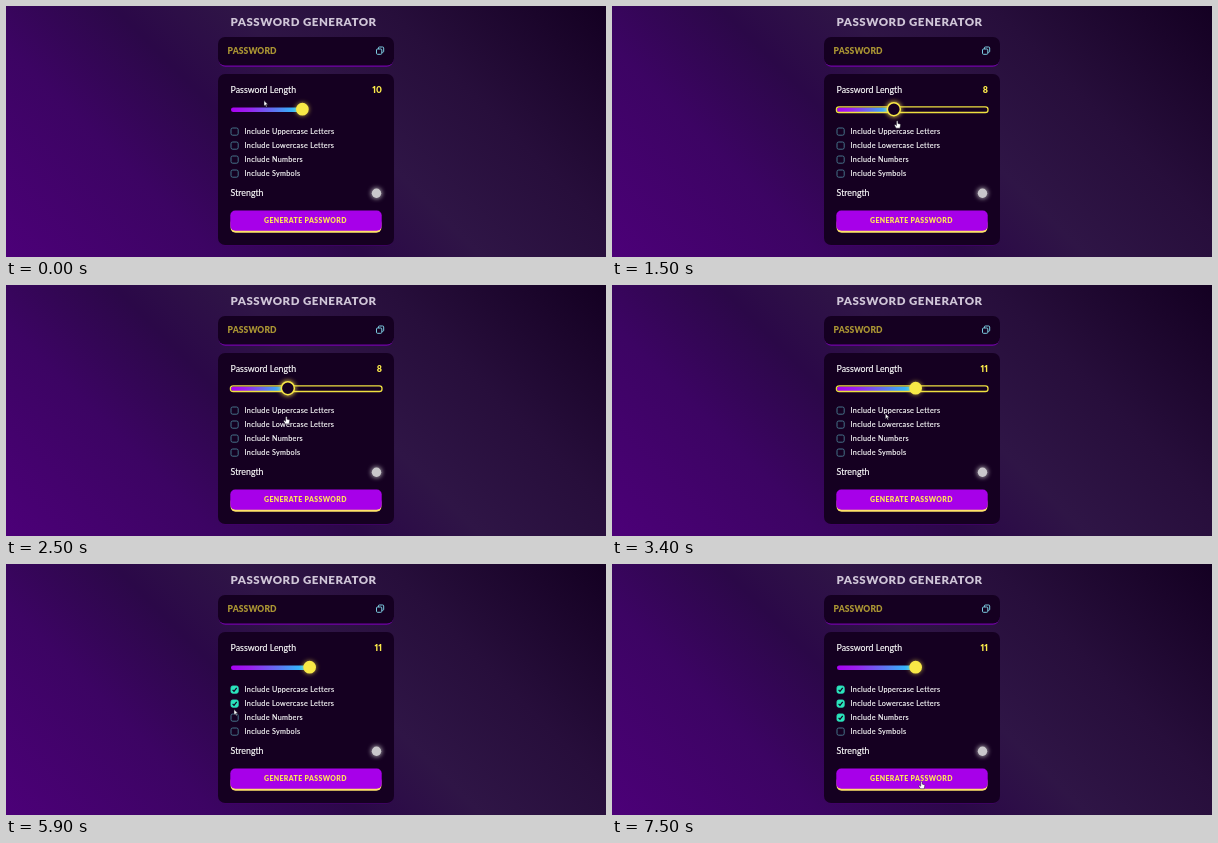
An HTML page for the animation above (8000 ms loop, 600 by 251 pixels).

```html
<!DOCTYPE html>
<html lang="en">
<head>
<meta charset="utf-8">
<title>Password generator</title>
<style>
  html, body { margin: 0; width: 100%; height: 100%; overflow: hidden; }
  body { background: linear-gradient(45deg, #4c0078, #3c0463 25%, #2b0848 42%, #2f1546 56%, #270e3b 74%, #140022); }
  svg { display: block; width: 100vw; height: 100vh; }
  text { font-family: Lato, "Open Sans", sans-serif; fill: #fff; }
  .bold { font-weight: 900; }
  .title { font-size: 11.5px; letter-spacing: .5px; fill: #d0c6d8; }
  .field { font-size: 8.5px; letter-spacing: .1px; fill: #aa9433; }
  .head, .label { stroke: #fff; stroke-width: .15px; }
  .head { font-size: 8.8px; }
  .label { font-size: 7.2px; letter-spacing: .32px; }
  .button { font-size: 6.9px; letter-spacing: .4px; fill: #ffe35a; }
  .value { font-size: 8.8px; fill: #fbe94a; font-variant-numeric: proportional-nums; }
</style>
</head>
<body>
<svg viewBox="0 0 600 251">
  <defs>
    <linearGradient id="fill">
      <stop offset="0" stop-color="#aa00f2"/>
      <stop offset=".25" stop-color="#9a22f0"/>
      <stop offset=".62" stop-color="#5c78f2"/>
      <stop offset="1" stop-color="#1fd4ff"/>
    </linearGradient>
    <filter id="blur" x="-100%" y="-100%" width="300%" height="300%">
      <feGaussianBlur stdDeviation="2.2"/>
    </filter>
  </defs>

  <text class="title bold" x="224.6" y="20.3">PASSWORD GENERATOR</text>

  <rect x="212.5" y="40" width="175" height="20.7" rx="7" fill="#7200a8"/>
  <rect x="212" y="31" width="176" height="28.6" rx="7" fill="#150021"/>
  <text class="field bold" x="221.6" y="48.2">PASSWORD</text>
  <g fill="#150021" stroke="#7ccbe0">
    <rect x="372.4" y="41" width="5.3" height="5.3" rx="1"/>
    <rect x="370.5" y="43" width="5.3" height="5.3" rx="1"/>
  </g>

  <rect x="212.5" y="80" width="175" height="159.7" rx="7" fill="#430069"/>
  <rect x="212" y="68" width="176" height="171" rx="7" fill="#150021"/>
  <text class="head" x="224.6" y="87.2">Password Length</text>
  <text class="value bold" id="value" x="376" y="87.2" text-anchor="end"></text>

  <rect id="bar" x="225" y="101.4" height="4.5" rx="2.2" fill="url(#fill)"/>
  <rect id="ring" x="224.4" y="100.9" width="151.6" height="5.6" rx="2.6" fill="none" stroke="#eee040" stroke-width="1.3"/>
  <g id="thumb">
    <circle id="glow" fill="#ffe84a" filter="url(#blur)"/>
    <circle id="knob" stroke="#f8e947" stroke-width="1.5"/>
  </g>

  <g id="options"></g>

  <text class="head" x="224.6" y="189.8">Strength</text>
  <circle cx="370.5" cy="187.2" r="5.8" fill="#ccc" opacity=".7" filter="url(#blur)"/>
  <circle cx="370.5" cy="187.2" r="4.7" fill="#c9c7cb"/>

  <rect x="224.6" y="212" width="150.8" height="14.8" rx="5" fill="#ffe36a"/>
  <rect x="224.3" y="204.5" width="151.4" height="20.2" rx="5" fill="#a700e9"/>
  <text class="button bold" x="258" y="216.9">GENERATE PASSWORD</text>

  <g id="cursor" fill="#fff" stroke="#171020" stroke-width=".5" stroke-linejoin="round">
    <path id="arrow" d="M0 0V5.4L1.3 4.3L2.2 6.3L3.1 5.9L2.2 3.9H3.9Z"/>
    <path id="hand" d="M-.8 .6Q0 -.4 .7 .6V2.9L2.9 3.5Q3.4 3.7 3.3 4.5L2.7 7.6H-1.1L-2.7 5Q-2.7 3.8 -1.8 4.1L-.8 5Z"/>
  </g>
</svg>
<script>
const LOOP = 8000, STEP = 100;
const PRESS = 1200, RELEASE = 3200;
const OPTIONS = ['Uppercase Letters', 'Lowercase Letters', 'Numbers', 'Symbols'];
const CHECKED = 3;

const $ = id => document.getElementById(id);
const ramp = (t, from, to) => Math.min(1, Math.max(0, (t - from) / (to - from)));
const mix = (a, b, k) => ({ x: a.x + (b.x - a.x) * k, y: a.y + (b.y - a.y) * k });

const clickTime = row => 4400 + 1100 * row;
const lengthAt = t => 10 - 4.6 * ramp(t, 1300, 1900) + 5.6 * ramp(t, 2200, 2900);
const thumbX = length => 231 + (length - 1) * 138 / 19;

// After the drag, the pointer visits the checked rows and then the button.
const button = { x: 309.5, y: 217.2 };
const visits = Array.from({ length: CHECKED + 1 }, (_, i) => ({
  start: i ? clickTime(i - 1) + 150 : RELEASE,
  to: i < CHECKED ? { x: 228, y: 124.4 + 14 * i } : button,
}));
const travel = (t, visit) => ramp(t, visit.start, visit.start + 500);

function pointerAt(t) {
  const grip = { x: thumbX(lengthAt(t)), y: 108.3 + 23 * ramp(t, PRESS, 2300) };
  const start = mix({ x: 258, y: 94.6 }, grip, ramp(t, 0, 800));
  return visits.reduce((at, visit) => mix(at, visit.to, travel(t, visit)), start);
}

function isHand(t) {
  return t >= 700 && !visits.some(visit => Math.abs(travel(t, visit) - .5) < .35);
}

function set(id, attrs) {
  for (const name in attrs) $(id).setAttribute(name, attrs[name]);
}

const show = (id, on) => set(id, { visibility: on ? 'visible' : 'hidden' });

$('options').innerHTML = OPTIONS.map((name, i) => `
  <g transform="translate(0 ${125.6 + 14 * i})">
    <rect id="box${i}" x="225" y="-3.6" width="7.2" height="7.2" rx="1.7" stroke-width=".9"/>
    <path id="tick${i}" d="M226.6 .3L228 1.8L230.7 -1.8" fill="none" stroke="#150021" stroke-width="1.2"/>
    <text class="label" x="238.6" y="2.1">Include ${name}</text>
  </g>`).join('');

function draw(time) {
  const t = Math.floor(time % LOOP / STEP) * STEP;

  const length = Math.round(lengthAt(t));
  const x = thumbX(length);
  const held = t >= PRESS && t < RELEASE;
  $('value').textContent = length;
  set('bar', { width: x - 225 });
  set('thumb', { transform: `translate(${x} 103.2)` });
  set('glow', { r: held ? 8 : 6.8, opacity: held ? .75 : .55 });
  set('knob', { r: held ? 6.5 : 5.6, fill: held ? '#150021' : '#f8e947' });
  show('ring', t >= PRESS && t < clickTime(0));

  OPTIONS.forEach((_, i) => {
    const on = i < CHECKED && t >= clickTime(i);
    set('box' + i, { fill: on ? '#2be5bd' : '#150021', stroke: on ? '#2be5bd' : '#4b7f95' });
    show('tick' + i, on);
  });

  const pointer = pointerAt(t);
  const hand = isHand(t);
  set('cursor', { transform: `translate(${pointer.x} ${pointer.y})` });
  show('hand', hand);
  show('arrow', !hand);
}

function tick() {
  draw(performance.now());
  requestAnimationFrame(tick);
}
tick();
</script>
</body>
</html>
```
